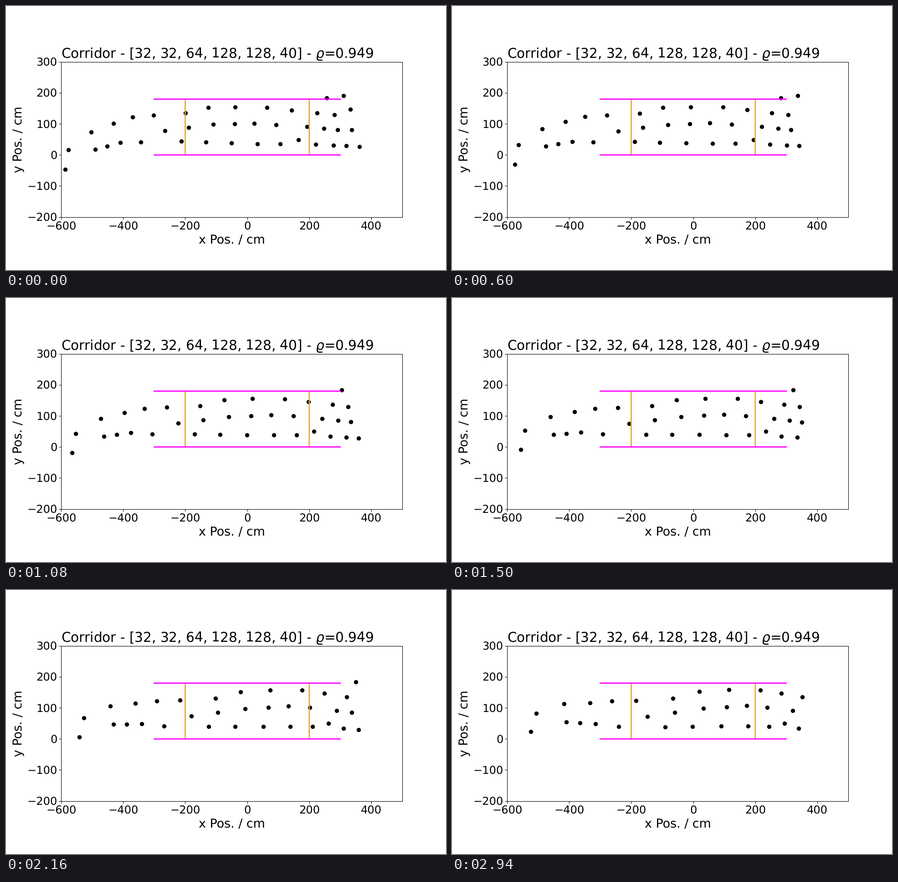
These frames come from a looping animation (966 by 580 pixels, 3 s). A matplotlib script:

```python
import numpy as np
import matplotlib.pyplot as plt
from matplotlib.animation import FuncAnimation

W, H, DPI = 966, 580, 64
FRAMES, STEP = 50, 60
MID = FRAMES // 2
PT = 96.6 / DPI             # one typographic point at the drawing's scale
LEFT, RIGHT, TOP, BOTTOM = 121.1, 870, 122.8, 463.55   # axes box in pixels

plt.rcParams.update({
    "font.family": "DejaVu Sans",
    "text.hinting": "none",
    "axes.linewidth": 0.8 * PT,
    "axes.titlepad": 6 * PT,
    "axes.labelpad": 4 * PT,
    **{f"{a}tick.major.{k}": v * PT
       for a, pad in (("x", 3.5), ("y", 3))
       for k, v in (("size", 3.5), ("width", 0.8), ("pad", pad))},
})


def lane(xs, *knots):
    """Walkers at xs halfway through the loop, on a line through the knots."""
    return np.column_stack([xs, np.interp(xs, *zip(*knots))])


crowd = np.vstack([
    lane([749, 784, 796], (749, 202), (784, 198), (796, 228)),
    lane([216, 269, 314, 364, 439, 493, 556, 627, 678, 729, 763],
         (216, 261), (300, 244), (439, 237), (500, 222), (620, 220), (763, 239)),
    lane([160, 389, 445, 503, 553, 597, 645, 707, 741, 768, 797],
         (160, 291), (389, 276), (500, 261), (600, 256), (680, 261), (770, 273)),
    lane([151, 223, 251, 283, 331, 426, 483, 543, 602, 652, 689, 723, 758,
          784, 811],
         (151, 333), (223, 300), (283, 295), (331, 299), (652, 301),
         (689, 293), (723, 304), (811, 310)),
])


def velocity(p):
    """Shared flow: gather on the left, speed up inside, slow at the exit."""
    x, y = p.T
    vx = np.interp(x, (130, 540, 630, 720, 800), (0.95, 2.05, 2.07, 1.7, 1.45))
    vy = np.interp(x, (125, 300, 400, 600, 780), (-1.15, 0, 0.1, -0.1, 0.05))
    return np.column_stack([vx + 0.002 * (270 - y), vy])


# Follow the flow forwards and backwards from the middle of the loop.
track = {MID: crowd}
for k in range(MID, FRAMES - 1):
    track[k + 1] = track[k] + velocity(track[k])
for k in range(MID, 0, -1):
    track[k - 1] = track[k] - velocity(track[k])


def positions(step):
    """Places in cm of everyone still in view, which ends at a slanted edge."""
    x, y = track[step].T
    seen = x < 777 - 0.08 * (310 - y)
    return np.column_stack([
        -600 + 1100 * (x - LEFT) / (RIGHT - LEFT),
        300 - 500 * (y - TOP) / (BOTTOM - TOP),
    ])[seen]


fig = plt.figure(figsize=(W / DPI, H / DPI), dpi=DPI, facecolor="white")
ax = fig.add_axes([LEFT / W, 1 - BOTTOM / H,
                   (RIGHT - LEFT) / W, (BOTTOM - TOP) / H])
ax.set_xlim(-600, 500)
ax.set_ylim(-200, 300)
ax.set_xticks(range(-600, 401, 200))
ax.set_yticks(range(-200, 301, 100))
ax.tick_params(labelsize=18 * PT)
ax.set_xlabel("x Pos. / cm", fontsize=20 * PT)
ax.set_ylabel("y Pos. / cm", fontsize=20 * PT)
ax.set_title(r"Corridor - [32, 32, 64, 128, 128, 40] - $\varrho$=0.949",
             fontsize=22 * PT, loc="left")

for x in (-200, 200):
    ax.plot([x, x], [0, 180], color="orange", lw=2 * PT, snap=False)
for y in (0, 180):
    ax.plot([-300, 300], [y, y], color="magenta", lw=2 * PT, snap=False)

dots = ax.scatter(*positions(0).T, s=(6 * PT) ** 2, color="black",
                  linewidths=PT)


def draw(step):
    dots.set_offsets(positions(step))
    return dots,


anim = FuncAnimation(fig, draw, frames=FRAMES, interval=STEP, repeat=True,
                     repeat_delay=0)
plt.show()
```
